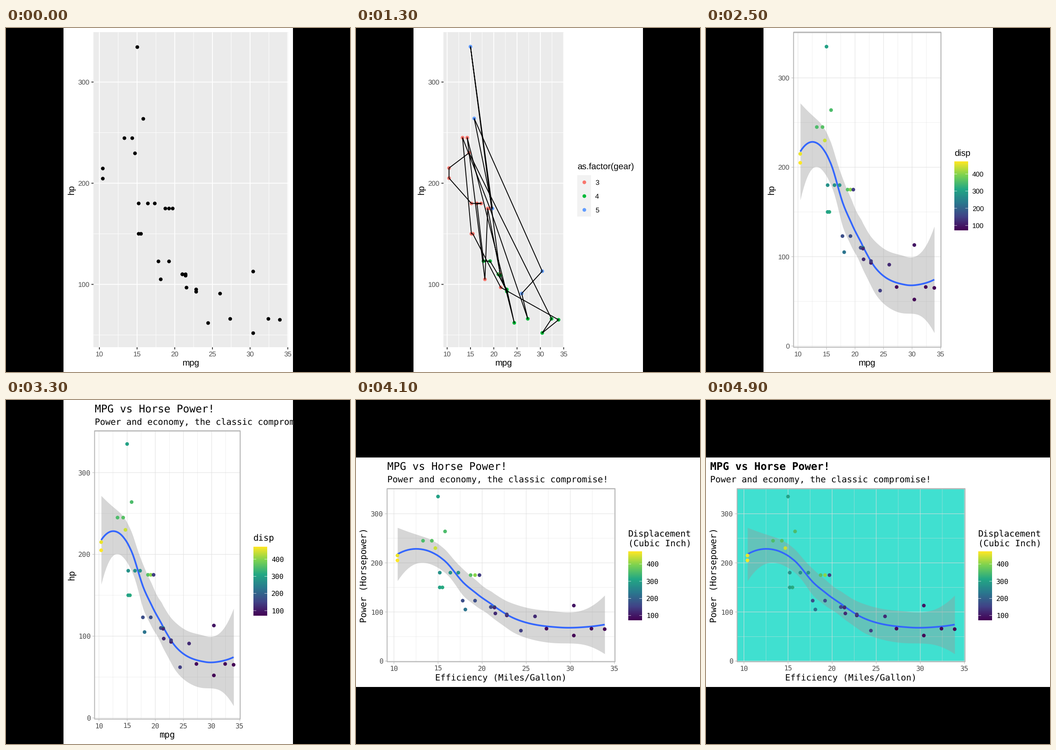
A matplotlib script that plays this animation: 748 by 748 pixels, repeating every 8000 ms.

```python
import numpy as np
import matplotlib.pyplot as plt
from matplotlib.animation import FuncAnimation
from matplotlib.colors import LinearSegmentedColormap
from matplotlib.patches import Rectangle

plt.rcParams["text.hinting"] = "none"

SIZE, DPI, TICK_MS, LOOP_MS = 748, 100, 100, 8000
PX = 72 / DPI
EDGE, FAR, MARGIN = 125, 624, 9.4
TITLE, BODY, SMALL = 22.75, 18.96, 15.15
SANS, MONO = "Liberation Sans", "DejaVu Sans Mono"
BLUES = LinearSegmentedColormap.from_list("blues", ["#132B43", "#56B1F7"])
VIRIDIS = LinearSegmentedColormap.from_list(
    "six_stops", plt.get_cmap("viridis")(np.linspace(0, 1, 6)))
GEAR_COLORS = {3: "#F8766D", 4: "#00BA38", 5: "#619CFF"}

MPG = np.array([21, 21, 22.8, 21.4, 18.7, 18.1, 14.3, 24.4, 22.8, 19.2, 17.8,
                16.4, 17.3, 15.2, 10.4, 10.4, 14.7, 32.4, 30.4, 33.9, 21.5,
                15.5, 15.2, 13.3, 19.2, 27.3, 26, 30.4, 15.8, 19.7, 15, 21.4])
HP = np.array([110, 110, 93, 110, 175, 105, 245, 62, 95, 123, 123,
               180, 180, 180, 205, 215, 230, 66, 52, 65, 97,
               150, 150, 245, 175, 66, 91, 113, 264, 175, 335, 109])
DISP = np.array([160, 160, 108, 258, 360, 225, 360, 146.7, 140.8, 167.6, 167.6,
                 275.8, 275.8, 275.8, 472, 460, 440, 78.7, 75.7, 71.1, 120.1,
                 318, 304, 350, 400, 79, 120.3, 95.1, 351, 145, 301, 121])
GEAR = ([4] * 3 + [3] * 4 + [4] * 4 + [3] * 6 + [4] * 3 + [3] * 5
        + [4] + [5] * 5 + [4])


# Loess: local quadratics at k-d tree vertices, blended by cubics.
def cuts(xs):
    if len(xs) <= 4 or xs[-1] - xs[0] <= 0.05 * np.ptp(MPG):
        return []
    mid = (len(xs) + 1) // 2
    untied = [k for k in range(1, len(xs)) if xs[k - 1] < xs[k]]
    k = min(untied, key=lambda k: (abs(k - mid), -k))
    return cuts(xs[:k]) + [(xs[k - 1] + xs[k]) / 2] + cuts(xs[k:])


def local_fit(v):
    dist = np.abs(MPG - v)
    reach = np.sort(dist)[int(0.75 * len(MPG)) - 1]
    root = np.sqrt((1 - np.clip(dist / reach, 0, 1) ** 3) ** 3)
    basis = np.vander(MPG - v, 3, increasing=True) * root[:, None]
    return (np.linalg.pinv(basis) * root)[:2]


def loess(grid):
    pad = 0.005 * np.ptp(MPG)
    knots = np.array([MPG.min() - pad, *cuts(np.sort(MPG)), MPG.max() + pad])
    fits = np.array([local_fit(k) for k in knots])

    def operator(x):
        j = np.searchsorted(knots, x) - 1
        width = (knots[j + 1] - knots[j])[:, None]
        t = (x - knots[j])[:, None] / width
        return ((1 + 2 * t) * (1 - t) ** 2 * fits[j, 0]
                + t * (1 - t) ** 2 * width * fits[j, 1]
                + t ** 2 * (3 - 2 * t) * fits[j + 1, 0]
                + t ** 2 * (t - 1) * width * fits[j + 1, 1])

    resid = np.eye(len(MPG)) - operator(MPG)
    gram = resid @ resid.T
    delta1, delta2 = np.trace(gram), np.trace(gram @ gram)
    sigma = np.sqrt(np.sum((resid @ HP) ** 2) / delta1)
    z, dof = 1.96, delta1 ** 2 / delta2
    quantile = z + (z ** 3 + z) / (4 * dof)
    rows = operator(grid)
    return rows @ HP, quantile * sigma * np.linalg.norm(rows, axis=1)


GRID = np.linspace(MPG.min(), MPG.max(), 80)
FIT, BAND = loess(GRID)

# Each step changes the plot a little; panels are (left, top, right, bottom).
STEPS = [
    (0, dict(panel=(190.4, 9.4, 613.9, 694.2), ylim=(37.85, 349.15), font=SANS,
             fill="#EBEBEB", light=False, cmap=BLUES, legend=None, color=None,
             path=False, smooth=None, titles=False, wide=False, flush=False,
             weight="normal", names=("mpg", "hp", ["disp"]))),
    (500, dict(panel=(190.4, 9.4, 452.3, 694.2), legend="gear")),
    (900, dict(color="gear")),
    (1300, dict(path=True)),
    (1700, dict(panel=(190.4, 9.4, 511, 694.2), ylim=(-1.42, 351.02), path=False,
                legend="disp", color="disp", smooth="above")),
    (2100, dict(smooth="below")),
    (2500, dict(light=True, fill="white", cmap=VIRIDIS)),
    (2900, dict(panel=(190.4, 67.2, 511, 694.2), titles=True)),
    (3300, dict(panel=(192.6, 67.2, 509.3, 693.8), font=MONO)),
    (3700, dict(panel=(192.6, 67.2, 439.2, 693.8),
                names=("Efficiency (Miles/Gallon)", "Power (Horsepower)",
                       ["Displacement", "(Cubic Inch)"]))),
    (4100, dict(panel=(67.6, 192.8, 563.3, 569.2), wide=True)),
    (4500, dict(flush=True)),
    (4900, dict(fill="#40E0D0", weight="bold")),
]

fig = plt.figure(figsize=(SIZE / DPI, SIZE / DPI), dpi=DPI, facecolor="black")
ax = fig.add_axes([0, 0, 1, 1])


def rect(x0, y0, x1, y1, color):
    ax.add_patch(Rectangle((x0, y0), x1 - x0, y1 - y0, fc=color, lw=0, zorder=1))


def line(xs, ys, color, width):
    ax.plot(xs, ys, color=color, lw=width * PX, zorder=1, snap=False,
            solid_capstyle="butt", solid_joinstyle="round")


def dots(xs, ys, colors):
    ax.scatter(xs, ys, s=(8 * PX) ** 2, c=colors, lw=0, zorder=1)


def text(x, y, string, size, font, color="black", ha="left", **style):
    ax.text(x, y, string, fontsize=size * PX, family=font, color=color, ha=ha,
            va="baseline", rotation_mode="anchor", zorder=1, **style)


def draw_legend(s):
    left, mid = s["panel"][2] + 28.8, (s["panel"][1] + s["panel"][3]) / 2
    names = ["as.factor(gear)"] if s["legend"] == "gear" else s["names"][2]
    height = 90 if s["legend"] == "gear" else 149.5
    top = mid + (27 + 20.4 * (len(names) - 1) - height) / 2
    for i, name in enumerate(reversed(names)):
        text(left, top - 12.8 - 20.4 * i, name, BODY, s["font"])

    if s["legend"] == "gear":
        rect(left, top, left + 30, top + height, "#F2F2F2")
        for i, (gear, color) in enumerate(GEAR_COLORS.items()):
            y = top + 15 + 30 * i
            dots([left + 15], [y], [color if s["color"] else "black"])
            text(left + 39, y + 5.4, str(gear), SMALL, s["font"])
        return

    ramp = np.linspace(1, 0, 150)[:, None]
    ax.imshow(ramp, cmap=s["cmap"], aspect="auto", zorder=1,
              extent=(left, left + 30, top + height, top))
    for value in range(100, 500, 100):
        y = top + height * (DISP.max() - value) / np.ptp(DISP)
        line([left, left + 6], [y, y], "white", 0.7)
        line([left + 24, left + 30], [y, y], "white", 0.7)
        text(left + 39, y + 5.4, str(value), SMALL, s["font"])


def draw_plot(s):
    left, top, right, bottom = s["panel"]
    low, high = s["ylim"]
    thin = 0.5 if s["light"] else 1
    grid_color = "#DEDEDE" if s["light"] else "white"
    tick_color = "#B3B3B3" if s["light"] else "#333333"
    font = s["font"]

    def px(v):
        return left + (np.asarray(v) - 9.225) / 25.85 * (right - left)

    def py(v):
        return bottom - (np.asarray(v) - low) / (high - low) * (bottom - top)

    def smooth():
        ax.fill_between(px(GRID), py(FIT - BAND), py(FIT + BAND),
                        color="#999999", alpha=0.4, lw=0, zorder=1)
        line(px(GRID), py(FIT), "#3366FF", 3.67)

    rect(left, top, right, bottom, s["fill"])
    x_ticks = range(10, 36, 5)
    y_ticks = [v for v in range(0, 301, 100) if v > low]
    x_minor = np.arange(12.5, 33, 5)
    y_minor = [v for v in range(50, 351, 100) if v < high]
    for xs, ys, width in ((x_minor, y_minor, 0.92), (x_ticks, y_ticks, 1.84)):
        for y in py(ys):
            line([left, right], [y, y], grid_color, width * thin)
        for x in px(xs):
            line([x, x], [top, bottom], grid_color, width * thin)

    if s["smooth"] == "below":
        smooth()
    colors = {None: "black", "gear": [GEAR_COLORS[g] for g in GEAR],
              "disp": s["cmap"]((DISP - DISP.min()) / np.ptp(DISP))}[s["color"]]
    dots(px(MPG), py(HP), colors)
    if s["smooth"] == "above":
        smooth()
    if s["path"]:
        line(px(MPG), py(HP), "black", 1.84)

    if s["light"]:
        line([left, right, right, left, left, right],
             [top, top, bottom, bottom, top, top], "#B3B3B3", 1.84)
    for v, x in zip(x_ticks, px(x_ticks)):
        line([x, x], [bottom, bottom + 4.7], tick_color, 1.84 * thin)
        text(x, bottom + 19.9, str(v), SMALL, font, "#4D4D4D", "center")
    for v, y in zip(y_ticks, py(y_ticks)):
        line([left - 4.7, left], [y, y], tick_color, 1.84 * thin)
        text(left - 8.5, y + 5.4, str(v), SMALL, font, "#4D4D4D", "right")


def draw(frame):
    s = {}
    for start, change in STEPS:
        if start <= frame * TICK_MS:
            s.update(change)

    ax.clear()
    ax.axis("off")
    box = (0, EDGE, SIZE, FAR) if s["wide"] else (EDGE, 0, FAR, SIZE)
    rect(*box, "white")
    draw_plot(s)
    if s["legend"]:
        draw_legend(s)

    left, top, right, bottom = s["panel"]
    text((left + right) / 2, box[3] - 13.7, s["names"][0], BODY, s["font"], ha="center")
    text(box[0] + 23, (top + bottom) / 2, s["names"][1], BODY, s["font"],
         ha="center", rotation=90)
    if s["titles"]:
        x = MARGIN if s["flush"] else left
        text(x, box[1] + 26.4, "MPG vs Horse Power!", TITLE, s["font"],
             weight=s["weight"])
        text(x, box[1] + 54, "Power and economy, the classic compromise!",
             BODY, s["font"])
    if not s["wide"]:
        rect(FAR, 0, SIZE, SIZE, "black")

    ax.set_xlim(0, SIZE)
    ax.set_ylim(SIZE, 0)


anim = FuncAnimation(fig, draw, frames=LOOP_MS // TICK_MS, interval=TICK_MS,
                     init_func=lambda: None, repeat=True, repeat_delay=0)
plt.show()
```
